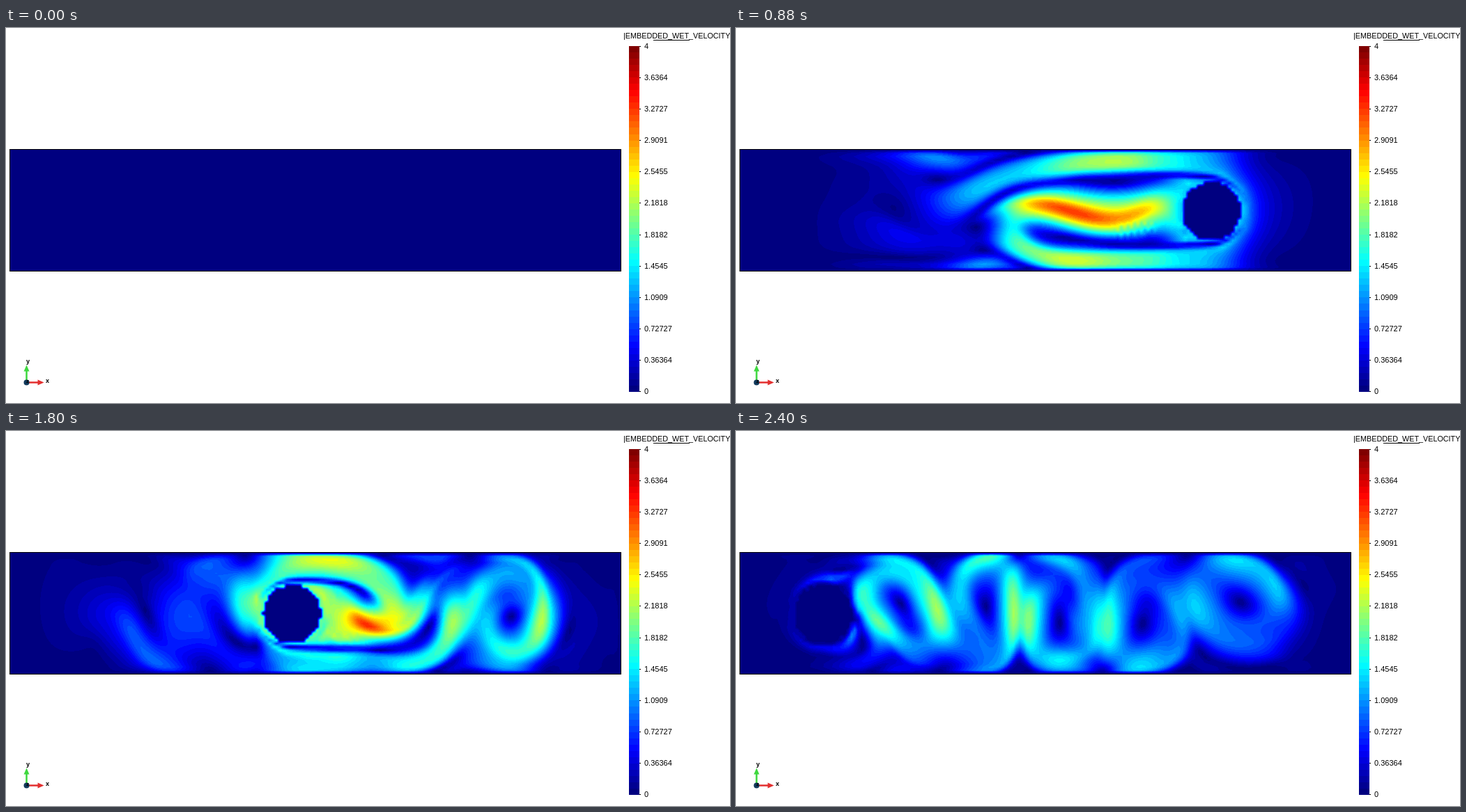
Recreate the animation shown at these times as an HTML page with a canvas. Size 1039 by 539 pixels, loop 2440 ms.

```html
<!DOCTYPE html>
<html lang="en">
<head>
<meta charset="utf-8">
<title>Embedded wet velocity</title>
<style>
html, body { margin: 0; width: 100%; height: 100%; overflow: hidden; background: #fff; }
canvas { display: block; }
</style>
</head>
<body>
<canvas id="stage" width="1039" height="539"></canvas>
<script>
const ctx = document.getElementById('stage').getContext('2d');
const LOOP = 2440, STEP = 40, BANDS = 55, VMAX = 4;
const X0 = 6, Y0 = 175, W = 876, H = 174;
const FONT = '"Liberation Sans", Arial, sans-serif';

// Flow grid: lengths in cells, times in ms, one solid cell all round
const ROWS = 36, CELL = H / ROWS, COLS = Math.round(W / CELL);
const NX = COLS + 2, NY = ROWS + 2;
const SUBSTEPS = 6, DT = STEP / SUBSTEPS;
const SWEEPS = 40, RELAX = 1.85;
const VISCOSITY = 0.08 / (CELL * CELL);
// The tank is 1 m high and each picture lasts 0.1 s
const TO_SPEED = STEP / 0.1 / ROWS;

// A cylinder swings along a closed tank, slightly below the middle
const RADIUS = ROWS / 4, SWING = 320 / CELL, OMEGA = 2 * Math.PI / 2400;
const bodyY = 1 + ROWS / 2 + 1.2 / CELL;
const bodyX = t => 1 + COLS / 2 - SWING * Math.cos(OMEGA * t);
const bodySpeed = t => SWING * OMEGA * Math.sin(OMEGA * t);

const clamp = (v, a = 0, b = 1) => Math.min(b, Math.max(a, v));
const mix = (a, b, f) => a + (b - a) * f;
const field = () => new Float64Array(NX * NY);

// Staggered velocities: u on left faces, v on top faces
let u = field(), v = field(), nextU = field(), nextV = field();
const open = field();

function linear(f, x, y) {
  x = clamp(x, 0, NX - 1.001);
  y = clamp(y, 0, NY - 1.001);
  const i = Math.floor(x), j = Math.floor(y), n = i + j * NX, fx = x - i;
  return mix(mix(f[n], f[n + 1], fx), mix(f[n + NX], f[n + NX + 1], fx), y - j);
}

function spline(a, b, c, d, f) {
  return b + 0.5 * f * (c - a + f * (2 * a - 5 * b + 4 * c - d + f * (3 * (b - c) + d - a)));
}

function cubic(f, x, y) {
  x = clamp(x, 1, NX - 2.001);
  y = clamp(y, 1, NY - 2.001);
  const i = Math.floor(x), j = Math.floor(y), fx = x - i;
  const row = n => spline(f[n - 1], f[n], f[n + 1], f[n + 2], fx);
  const n = i + j * NX;
  return spline(row(n - NX), row(n), row(n + NX), row(n + 2 * NX), y - j);
}

// Transport a field along the flow; its samples sit at offset ox, oy in a cell
function advect(f, out, ox, oy) {
  for (let j = 1; j < NY - 1; j++) {
    for (let i = 1; i < NX - 1; i++) {
      const n = i + j * NX, x = i + ox, y = j + oy;
      const mx = x - DT / 2 * linear(u, x, y - 0.5);
      const my = y - DT / 2 * linear(v, x - 0.5, y);
      const px = x - DT * linear(u, mx, my - 0.5);
      const py = y - DT * linear(v, mx - 0.5, my);
      const spread = f[n - 1] + f[n + 1] + f[n - NX] + f[n + NX] - 4 * f[n];
      out[n] = cubic(f, px - ox, py - oy) + VISCOSITY * DT * spread;
    }
  }
}

function setSolids(t) {
  const cx = bodyX(t), speed = bodySpeed(t);
  for (let j = 1; j < NY - 1; j++) {
    for (let i = 1; i < NX - 1; i++) {
      const n = i + j * NX;
      open[n] = Math.hypot(i + 0.5 - cx, j + 0.5 - bodyY) > RADIUS ? 1 : 0;
      if (open[n]) continue;
      u[n] = u[n + 1] = speed;
      v[n] = v[n + NX] = 0;
    }
  }
  // No slip: values mirror with opposite sign across the walls
  for (let i = 0; i < NX; i++) {
    const last = i + (NY - 1) * NX;
    v[i + NX] = v[last] = 0;
    u[i] = -u[i + NX];
    u[last] = -u[last - NX];
  }
  for (let j = 0; j < NY; j++) {
    const first = j * NX, last = first + NX - 1;
    u[first + 1] = u[last] = 0;
    v[first] = -v[first + 1];
    v[last] = -v[last - 1];
  }
}

// Remove divergence from every open cell
function project() {
  for (let k = 0; k < SWEEPS; k++) {
    for (let j = 1; j < NY - 1; j++) {
      for (let n = j * NX + 1; n < (j + 1) * NX - 1; n++) {
        if (!open[n]) continue;
        const l = open[n - 1], r = open[n + 1], a = open[n - NX], b = open[n + NX];
        const sides = l + r + a + b;
        if (!sides) continue;
        const p = -RELAX * (u[n + 1] - u[n] + v[n + NX] - v[n]) / sides;
        u[n] -= l * p;
        u[n + 1] += r * p;
        v[n] -= a * p;
        v[n + NX] += b * p;
      }
    }
  }
}

function advance(t) {
  setSolids(t);
  advect(u, nextU, 0, 0.5);
  advect(v, nextV, 0.5, 0);
  [u, nextU] = [nextU, u];
  [v, nextV] = [nextV, v];
  setSolids(t);
  project();
}

// Speed at the cell corners, zero inside the body
function snapshot(t) {
  const nodes = new Float32Array((COLS + 1) * (ROWS + 1));
  const cx = bodyX(t);
  let o = 0;
  for (let j = 1; j < NY; j++) {
    for (let i = 1; i < NX; i++, o++) {
      const n = i + j * NX;
      if (Math.hypot(i - cx, j - bodyY) < RADIUS - 0.4) continue;
      nodes[o] = TO_SPEED / 2 * Math.hypot(u[n] + u[n - NX], v[n] + v[n - 1]);
    }
  }
  return nodes;
}

// The tank starts at rest; later states are worked out once and kept
const states = [new Float32Array((COLS + 1) * (ROWS + 1))];

function stateAt(index) {
  while (states.length <= index) {
    const t = states.length * STEP;
    for (let k = 1; k <= SUBSTEPS; k++) advance(t + k * DT);
    states.push(snapshot(t + STEP));
  }
  return states[index];
}

const palette = Array.from({ length: BANDS }, (_, i) => {
  const level = 4 * i / (BANDS - 1);
  return [3, 2, 1].map(c => Math.round(255 * clamp(1.5 - Math.abs(level - c))));
});

const image = ctx.createImageData(W, H);

function paintFlow(index) {
  const nodes = stateAt(index), stride = COLS + 1;
  let o = 0;
  for (let py = 0; py < H; py++) {
    const y = (py + 0.5) * ROWS / H, j = Math.floor(y);
    for (let px = 0; px < W; px++) {
      const x = (px + 0.5) * COLS / W, i = Math.floor(x), n = i + j * stride;
      const s = mix(mix(nodes[n], nodes[n + 1], x - i),
        mix(nodes[n + stride], nodes[n + stride + 1], x - i), y - j);
      const rgb = palette[clamp(Math.floor(s / VMAX * BANDS), 0, BANDS - 1)];
      image.data[o++] = rgb[0];
      image.data[o++] = rgb[1];
      image.data[o++] = rgb[2];
      image.data[o++] = 255;
    }
  }
  ctx.putImageData(image, X0, Y0);
}

function text(s, x, y, size = 11, weight = '') {
  ctx.font = `${weight} ${size}px ${FONT}`;
  ctx.fillText(s, x, y);
}

function paintLegend() {
  const top = 26, height = 497;
  const edge = i => Math.round(top + height * (1 - i / BANDS));
  palette.forEach((rgb, i) => {
    ctx.fillStyle = `rgb(${rgb})`;
    ctx.fillRect(894, edge(i + 1), 15, edge(i) - edge(i + 1));
  });
  ctx.fillStyle = '#000';
  for (let i = 0; i <= 11; i++) {
    const y = Math.round(top + 496 * (1 - i / 11));
    ctx.fillRect(909, y, 2, 1);
    text(String(+(VMAX * i / 11).toPrecision(5)), 916, y + 4);
  }
  text('|EMBEDDED_WET_VELOCITY', 886, 15, 10.8);
  ctx.fillRect(929, 17, 52, 1);
}

function arrow(angle, color) {
  ctx.save();
  ctx.translate(29.5, 509.5);
  ctx.rotate(angle);
  ctx.fillStyle = color;
  ctx.fillRect(0, -1.25, 18, 2.5);
  ctx.beginPath();
  ctx.moveTo(16, -4);
  ctx.lineTo(25, 0);
  ctx.lineTo(16, 4);
  ctx.fill();
  ctx.restore();
}

function paintAxes() {
  arrow(0, '#e33030');
  arrow(-Math.PI / 2, '#3fd83f');
  ctx.fillStyle = '#123a5c';
  ctx.beginPath();
  ctx.arc(29.5, 509.5, 4, 0, 2 * Math.PI);
  ctx.fill();
  ctx.fillStyle = '#000';
  text('y', 29, 482, 9, 'bold');
  text('x', 57, 510, 9, 'bold');
  text('z', 29, 510, 8, 'bold');
}

ctx.fillStyle = '#fff';
ctx.fillRect(0, 0, 1039, 539);
ctx.strokeRect(X0 - 0.5, Y0 - 0.5, W + 1, H + 1);
paintLegend();
paintAxes();

const start = performance.now();
let shown = -1;

function tick() {
  const index = Math.floor((performance.now() - start) % LOOP / STEP);
  if (index !== shown) paintFlow(shown = index);
  requestAnimationFrame(tick);
}
tick();
</script>
</body>
</html>
```
